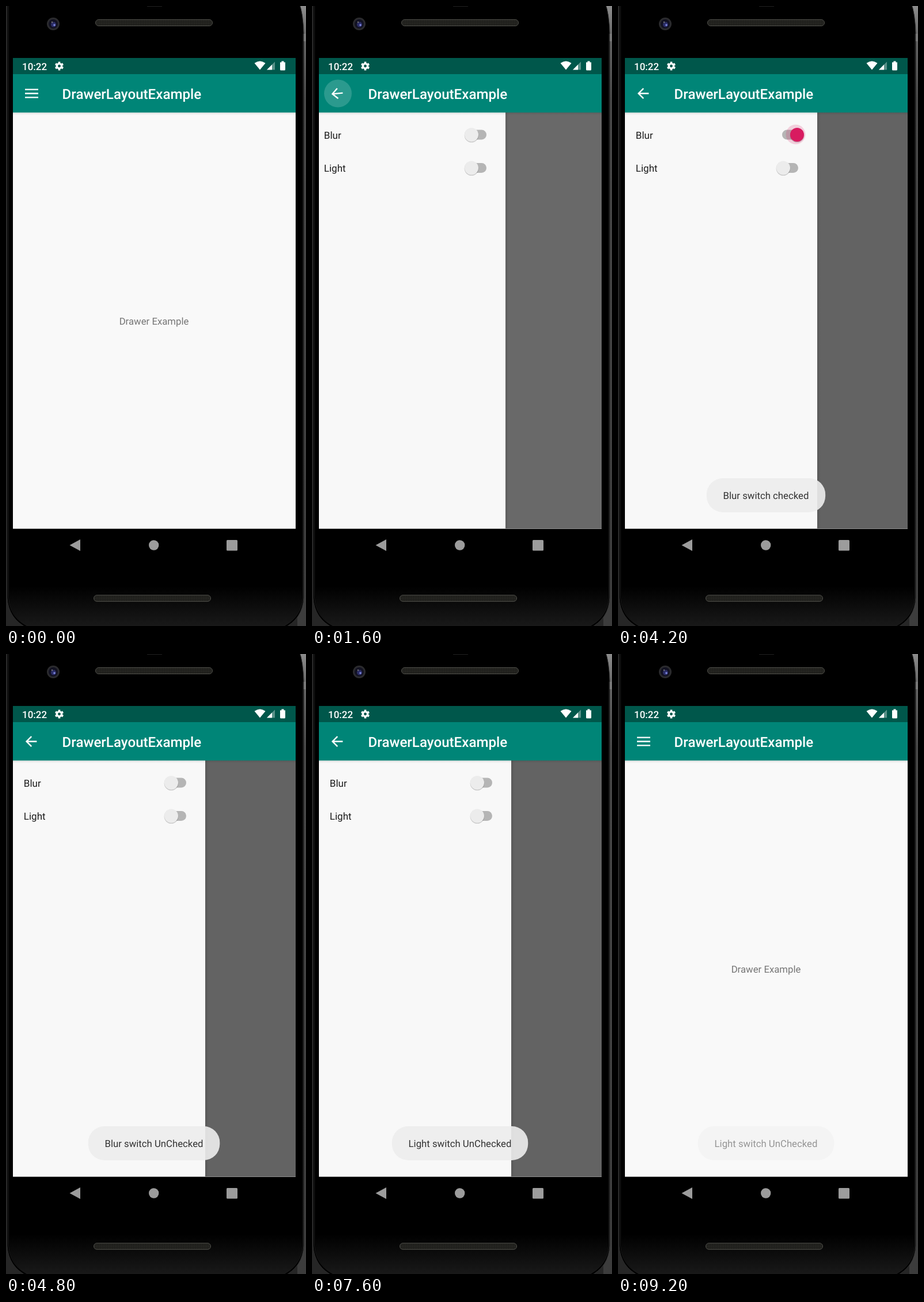
An HTML page for the animation above (9300 ms loop, 521x1074 px).

```html
<!DOCTYPE html>
<html lang="en">
<head>
<meta charset="utf-8">
<title>Drawer demo</title>
<style>
html, body { margin: 0; width: 100%; height: 100%; overflow: hidden; background: #000; }
svg { display: block; width: 521px; height: 1074px; font: 16.75px Roboto, sans-serif; text-rendering: geometricPrecision; }
</style>
</head>
<body>
<svg viewBox="0 0 521 1074">
  <defs>
    <linearGradient id="chin" x2="0" y2="1"><stop stop-color="#000"/><stop offset="1" stop-color="#191919"/></linearGradient>
    <linearGradient id="edge" x2="0" y2="1"><stop stop-color="#8c8c8c"/><stop offset=".05" stop-color="#666"/><stop offset=".15" stop-color="#484848"/><stop offset="1" stop-color="#3c3c3c"/></linearGradient>
    <linearGradient id="down" x2="0" y2="1"><stop stop-opacity=".11"/><stop offset="1" stop-opacity="0"/></linearGradient>
    <linearGradient id="side"><stop stop-opacity=".11"/><stop offset="1" stop-opacity="0"/></linearGradient>
    <pattern id="mesh" width="3" height="3" patternUnits="userSpaceOnUse"><rect width="3" height="3" fill="#1e1e1b"/><rect width="1.3" height="1.3" fill="#35352f"/></pattern>
    <clipPath id="screen"><rect x="12" y="184" width="491" height="721"/></clipPath>
  </defs>

  <!-- phone body -->
  <rect width="521" height="1074" fill="#262626"/>
  <rect x="506" width="15" height="1074" fill="url(#edge)"/>
  <path d="M2-5V1025Q4 1062 38 1078H482Q515 1062 517 1025V48Q516 12 509-5Z" stroke="#2c2c2c"/>
  <rect x="517" y="48" width="4" height="13" fill="#777"/>
  <path d="M6 1005V1030Q9 1058 36 1074H484Q511 1058 514 1030V1005Z" fill="url(#chin)"/>
  <path d="M4.5 0V1025Q7 1060 38 1074M515.5 48V1025Q512 1060 482 1074" fill="none" stroke="#1b1b1b"/>
  <rect x="245" width="26" height="1" fill="#222"/>
  <g fill="url(#mesh)" stroke="#4c4c47">
    <rect x="155.500" y="23.500" width="203" height="11" rx="5.5"/>
    <rect x="152.500" y="1020.500" width="203" height="11" rx="5.5"/>
  </g>
  <circle cx="82" cy="31" r="11" fill="#2b2b2e"/>
  <circle cx="82" cy="31" r="8" fill="#121222"/>
  <circle cx="82.500" cy="32" r="4.500" fill="#2b2d66"/>
  <circle cx="84" cy="33" r="1.800" fill="#7f88e0"/>
  <circle cx="80" cy="28" r="1.200" fill="#777"/>

  <!-- app content -->
  <g clip-path="url(#screen)">
    <rect x="12" y="184" width="491" height="722" fill="#f9f9f9"/>
    <text x="257" y="551.500" text-anchor="middle" fill="#757575">Drawer Example</text>
    <rect id="scrim" x="12" y="184" width="491" height="722"/>
    <g id="drawer">
      <rect x="346" y="184" width="6" height="722" fill="url(#side)"/>
      <rect x="12" y="184" width="334" height="722" fill="#f8f8f8"/>
      <g fill="#1c1c1c" font-size="17">
        <text x="30.800" y="229.500">Blur</text>
        <text x="30.800" y="287">Light</text>
      </g>
    </g>
    <rect x="12" y="184" width="491" height="5" fill="url(#down)"/>
    <g id="toasts"></g>
  </g>
  <path d="M12 905.500H503" stroke="#8c8c8c"/>

  <!-- system bars -->
  <rect x="12" y="90" width="491" height="28" fill="#00574b"/>
  <rect x="12" y="118" width="491" height="66.500" fill="#008577"/>
  <g fill="#fff">
    <text x="28" y="110.500" font-size="17" font-weight="500">10:22</text>
    <g fill="none" stroke="#fff">
      <circle cx="92.500" cy="104" r="4.100" stroke-width="3.400"/>
      <circle cx="92.500" cy="104" r="6.300" stroke-width="2.600" pathLength="12" stroke-dasharray="1.100 .9" stroke-dashoffset="-.450"/>
    </g>
    <path d="M441 110.500L431.500 99Q441 92 450.500 99Z"/>
    <path d="M453 110.500L467 96.500V110.500Z" opacity=".35"/>
    <path d="M453 110.500L462 101.500V110.500Z"/>
    <path d="M476 97.500h2.500v-2h4v2H485V110Q485 111.500 483.500 111.500H477.500Q476 111.500 476 110Z"/>
    <text x="97.500" y="160.700" font-size="24.150" font-weight="500">DrawerLayoutExample</text>
    <circle id="ripple"/>
    <path id="icon" fill="none" stroke="#fff" stroke-width="2.400"/>
  </g>
  <g fill="#9c9c9c">
    <path d="M110.500 934L129 924V944Z"/>
    <circle cx="256.700" cy="934" r="8.700"/>
    <rect x="383" y="925" width="19" height="18.500" rx="1.500"/>
  </g>
</svg>
<script>
const $ = id => document.getElementById(id);
const LOOP = 9300, STEP = 100, WIDTH = 334, CENTER = 257;
const OPEN = 1373.7, CLOSE = 8220;

function add(parent, tag, attrs = {}) {
  const el = parent.appendChild(document.createElementNS('http://www.w3.org/2000/svg', tag));
  set(el, attrs);
  return el;
}
function set(el, attrs) {
  for (const key in attrs) el.setAttribute(key, attrs[key]);
}
const lerp = (a, b, p) => a + (b - a) * p;
const mix = (a, b, p) => `rgb(${a.map((v, i) => lerp(v, b[i], p))})`;
// Value at a step; the last entry holds
const at = (list, step) => list[Math.max(0, Math.min(step, list.length - 1))];

const GREY = [236, 236, 236], PINK = [216, 27, 96];
const toggles = [
  { start: 2800, row: 0, on: 1, delay: 0, text: 'Blur switch checked' },
  { start: 4200, row: 0, on: 0, delay: 1, text: 'Blur switch UnChecked' },
  { start: 5500, row: 1, on: 1, delay: 0, text: 'Light switch checked.' },
  { start: 7100, row: 1, on: 0, delay: 0, text: 'Light switch UnChecked' }
];

const switches = [223, 280.5].map(y => ({
  track: add($('drawer'), 'rect', { x: 285, y: y - 8.5, width: 28, height: 17, rx: 8.5 }),
  halo: add($('drawer'), 'circle', { cy: y - .5 }),
  shadow: add($('drawer'), 'circle', { cy: y + 1, r: 12.3, opacity: .2 }),
  thumb: add($('drawer'), 'circle', { cy: y, r: 12 })
}));

for (const toggle of toggles) {
  toggle.box = add($('toasts'), 'g');
  const pill = add(toggle.box, 'rect', { y: 818, height: 59, rx: 28, fill: '#eee', 'fill-opacity': .9 });
  const label = add(toggle.box, 'text', { x: CENTER, y: 854, 'text-anchor': 'middle', fill: '#323232' });
  label.textContent = toggle.text;
  const width = label.getComputedTextLength() + 57.5;
  set(pill, { x: CENTER - width / 2, width });
}

const settle = elapsed => 1 - (1 - Math.max(0, Math.min(elapsed / 449, 1))) ** 5;
const slide = t => t < CLOSE ? settle(t - OPEN) : 1 - settle(t - CLOSE);

function drawIcon(p, closing) {
  const size = lerp(23, 13.4, p), shaft = lerp(23, 19.5, p), cut = lerp(0, .85, p);
  const angle = p * Math.PI / 4, offset = lerp(6.9, -.85, p);
  const dx = size * Math.cos(angle), dy = size * Math.sin(angle), x = -shaft / 2;
  const turn = 180 * (p - 1) * (closing ? -1 : 1);
  set($('icon'), {
    d: `M${x + cut} 0h${shaft - 2 * cut}M${x} ${offset}l${dx} ${dy}M${x} ${-offset}l${dx} ${-dy}`,
    transform: `translate(44.5 151.500) rotate(${turn})`
  });
}

function drawRipple(t) {
  const closing = t >= 8300;
  const path = closing
    ? [[46.5, 151, 23, .2], [45.5, 151, 24, .17], [45, 151, 24, .08], [0, 0, 0, 0]]
    : [[47.5, 154, 20.5, .09], [46, 152.5, 23, .16], [45, 151.5, 24, .17], [44.5, 151.5, 24, .07], [0, 0, 0, 0]];
  const [cx, cy, r, opacity] = t < 1400 ? [0, 0, 0, 0] : at(path, (t - (closing ? 8300 : 1400)) / STEP);
  set($('ripple'), { cx, cy, r, opacity });
}

function drawSwitch(parts, row, t) {
  const last = toggles.filter(g => g.row === row && g.start <= t).pop();
  const on = last ? last.on : 0, step = last ? (t - last.start) / STEP : 9;
  const moved = at([0, .45, .95, 1], step);
  const p = on ? moved : 1 - moved;
  const cx = lerp(287, 311, p), fill = mix(GREY, PINK, p);
  set(parts.track, { fill: on ? '#f3bbd0' : '#b5b5b5' });
  set(parts.thumb, { cx, fill });
  set(parts.shadow, { cx });
  set(parts.halo, {
    cx: cx - 5 * (p - .5), r: at([17, 21, 22], step),
    fill: mix([120, 120, 120], PINK, p), opacity: at([.18, .18, .14, .07, 0], step)
  });
}

function drawToasts(t) {
  toggles.forEach((toggle, i) => {
    const next = toggles[i + 1];
    let opacity = at([0, 0, 0, .35, .75, 1], (t - toggle.start) / STEP - toggle.delay);
    if (next && t >= next.start) opacity = at([1, .8, .35, 0], (t - next.start) / STEP - next.delay);
    if (!next && t >= 9000) opacity = .9 - (t - 9000) / 500;
    set(toggle.box, { opacity });
  });
}

function draw(t) {
  const p = slide(t), shift = Math.round((p - 1) * WIDTH);
  set($('drawer'), { transform: `translate(${shift} 0)`, visibility: shift > -WIDTH ? 'visible' : 'hidden' });
  set($('scrim'), { opacity: .6 * slide(t - 13) });
  drawIcon(p, t >= CLOSE);
  drawRipple(t);
  switches.forEach((parts, row) => drawSwitch(parts, row, t));
  drawToasts(t);
}

const begin = performance.now();
function tick() {
  const t = (performance.now() - begin) % LOOP;
  draw(Math.floor(t / STEP) * STEP);
  requestAnimationFrame(tick);
}
tick();
</script>
</body>
</html>
```
